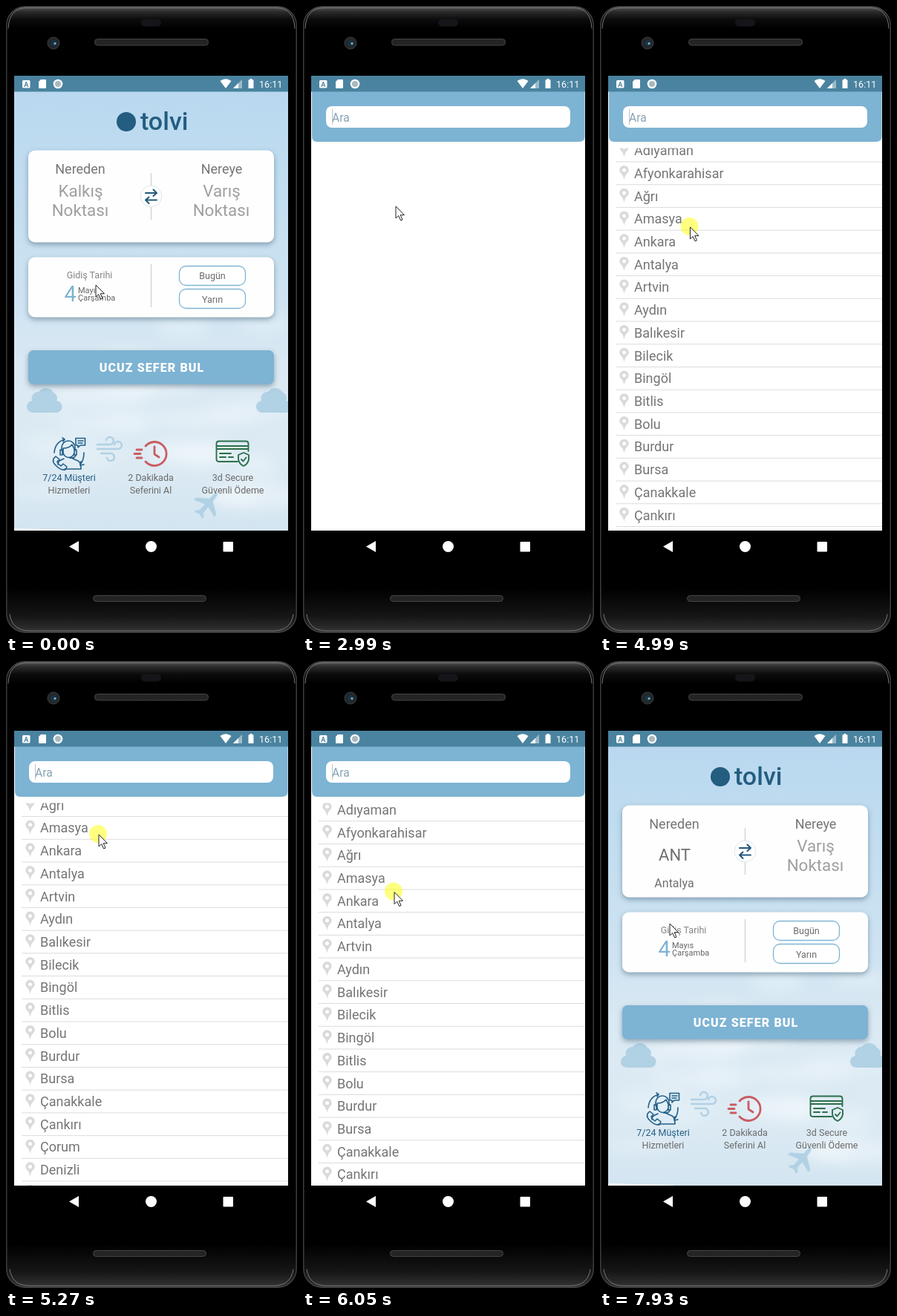
Write an HTML page that moves like this. It is 392 px wide and 845 px high and loops after 8000 ms.

```html
<!DOCTYPE html>
<html lang="tr">
<head>
<meta charset="utf-8">
<title>Sefer arama</title>
<style>
html, body { margin: 0; width: 100%; height: 100%; overflow: hidden; background: #000; }
svg { display: block; width: 392px; height: 845px; font-family: Roboto, sans-serif; }
.mid { text-anchor: middle; }
.line { fill: none; stroke-linecap: round; stroke-linejoin: round; }
.card { fill: #fefefe; filter: drop-shadow(0 3px 3.5px #3c5a7080); }
.t12 { font-size: 12.5px; fill: #6b6b6b; }
.t18 { font-size: 18px; fill: #757575; }
.t22 { font-size: 22.4px; fill: #a0a0a0; }
</style>
</head>
<body>
<svg viewBox="0 0 392 845">
  <defs>
    <linearGradient id="sky" x2="0" y2="1">
      <stop offset="0" stop-color="#b9d8ef"/><stop offset=".25" stop-color="#c3def0"/>
      <stop offset=".5" stop-color="#d0e4f2"/><stop offset=".62" stop-color="#dae9f3"/>
      <stop offset=".85" stop-color="#dceaf3"/><stop offset="1" stop-color="#d3e5f1"/>
    </linearGradient>
    <linearGradient id="body" x2="0" y2="1">
      <stop offset="0" stop-color="#5a5a5a"/><stop offset=".008" stop-color="#2c2c2c"/>
      <stop offset=".02" stop-color="#0c0c0c"/><stop offset=".035" stop-color="#000"/>
      <stop offset=".93" stop-color="#000"/><stop offset=".975" stop-color="#161616"/>
      <stop offset="1" stop-color="#353535"/>
    </linearGradient>
    <pattern id="mesh" width="3" height="3" patternUnits="userSpaceOnUse">
      <rect width="3" height="3" fill="#2b2b2b"/><path d="M0 3L3 0" stroke="#161616"/>
    </pattern>
    <filter id="soft" x="-50%" y="-50%" width="200%" height="200%"><feGaussianBlur stdDeviation="9"/></filter>
    <clipPath id="screen"><rect x="11" y="94" width="369" height="613"/></clipPath>
    <clipPath id="listArea"><rect x="11" y="191.5" width="369" height="515.5"/></clipPath>
    <path id="cloud" d="M-15 16a8 8 0 0 1-2-16a9 9 0 0 1 9-12a12 12 0 0 1 20 1a8 8 0 0 1 4 11a8 8 0 0 1-1 16Z"/>
    <g id="pin"><path d="M0 9.5C-2-.5-6.2 1-6.2-3.6a6.2 6.2 0 0 1 12.4 0C6.2 1 2-.5 0 9.5Z" fill="#dadada"/><circle cy="-3.6" r="2.5" fill="#fff"/></g>
  </defs>

  <rect width="392" height="845" fill="#000"/>
  <rect x=".8" y=".8" width="390.4" height="843.4" rx="25" fill="url(#body)" stroke="#4a4a4a" stroke-width="1.2"/>
  <path class="line" d="M3 30Q4 3 28 2.500H364Q388 3 389 30M5 820Q8 841 30 842H362Q384 841 387 820" stroke="#777"/>
  <rect x="182" y="17.500" width="27" height="10" rx="5" fill="#15151a"/>
  <rect x="119.500" y="44.500" width="153" height="8.500" rx="4" fill="url(#mesh)" stroke="#444"/>
  <rect x="117.500" y="794.500" width="152" height="8" rx="4" fill="url(#mesh)" stroke="#444"/>
  <circle cx="64" cy="50" r="8" fill="#23272a" stroke="#3a3e42"/>
  <circle cx="64.500" cy="50" r="4" fill="#183444"/><circle cx="66" cy="50.500" r="1.500" fill="#87b5c8"/>

  <g fill="#fff">
    <path d="M85 728.500L98 721V736Z"/><circle cx="195.500" cy="728.500" r="7.500"/>
    <rect x="292.500" y="722" width="13.500" height="13.500" rx="1"/>
  </g>

  <g clip-path="url(#screen)">
    <g id="home">
      <rect x="11" y="115" width="369" height="592" fill="url(#sky)"/>
      <g id="haze" fill="#f2f8fb" filter="url(#soft)"></g>
      <path d="M11 704L100 706.500V707H11Z" fill="#fff"/>
      <g fill="#b1d1e4">
        <use href="#cloud" x="52" y="532"/><use href="#cloud" x="361" y="532"/>
        <path transform="translate(272 671) rotate(40)" d="M0-20Q3-18 3-7L18 4V8L3 3V13L7 17V20L0 18L-7 20V17L-3 13V3L-18 8V4L-3-7Q-3-18 0-20Z"/>
      </g>
      <path class="line" d="M123 591H140a5 5 0 1 0-5-6M123 597H151a5 5 0 1 0-5-6M128 603H140a5 5 0 1 1-4 6" stroke="#b1d1e4" stroke-width="2.600"/>

      <circle cx="162" cy="156" r="13" fill="#235d80"/>
      <text x="181" y="167" font-size="34" font-weight="500" fill="#235d80">tolvi</text>

      <rect class="card" x="30" y="194.500" width="331" height="124" rx="9"/>
      <rect class="card" x="30" y="338.500" width="331" height="81" rx="9"/>
      <path d="M195.500 225V288M195.500 348V406" stroke="#c9c9c9"/>
      <circle cx="195.500" cy="256.500" r="14.300" fill="#fff" stroke="#dfe5e9"/>
      <path class="line" d="M188 252H203M198.500 247.500L203 252L198.500 256M203 261.500H188M192.500 257.500L188 261.500L192.500 266" stroke="#22587c" stroke-width="2"/>
      <g class="mid">
        <text class="t18" x="100" y="226">Nereden</text>
        <text class="t18" x="290.500" y="226">Nereye</text>
        <g id="unset" class="t22"><text x="100.500" y="256.500">Kalkış</text><text x="100" y="283">Noktası</text></g>
        <g id="chosen"><text x="100.500" y="269" font-size="22" fill="#6e6e6e">ANT</text><text x="100" y="305" font-size="16" fill="#707070">Antalya</text></g>
        <text class="t22" x="290.500" y="256.500">Varış</text><text class="t22" x="290" y="283">Noktası</text>
        <text class="t12" x="112.500" y="367" style="fill:#858585">Gidiş Tarihi</text>
        <g fill="#fff" stroke="#7fb4d3" stroke-width="1.300">
          <rect x="233.500" y="350.500" width="89" height="26" rx="9"/><rect x="233.500" y="381.500" width="89" height="26" rx="9"/>
        </g>
        <text class="t12" x="278" y="368">Bugün</text><text class="t12" x="278" y="399.500">Yarın</text>
      </g>
      <text x="78.500" y="397.500" font-size="29" fill="#7db3d3">4</text>
      <g font-size="11" fill="#666"><text x="97" y="387">Mayıs</text><text x="97" y="397">Çarşamba</text></g>

      <rect class="card" x="30" y="464" width="331" height="45.500" rx="7" style="fill:#7db3d3"/>
      <text class="mid" x="196.500" y="493" font-size="16" font-weight="900" letter-spacing="1.100" fill="#fff">UCUZ SEFER BUL</text>

      <g class="line" stroke="#225f88" stroke-width="1.600">
        <path d="M75 599V595a9 9 0 0 1 18 0V599M77 596Q85 596 89 591Q91 595 92 597V601a7.500 7.500 0 0 1-15 0ZM73 598h3v7h-3ZM92 598h3v7h-3ZM94 605Q93 610 86 609M78 610L72 613Q70 614 70 618M90 610L97 613Q101 615 101 624H79"/>
        <path d="M65 602Q66 588 79 584L76 582M79 584L77 587M105 602Q105 612 100 618M101 614L100 619L105 618"/>
        <path d="M64 610Q62 615 68 620Q74 626 80 625L82 621L77 617L74 620Q69 616 69 614L72 611L67 607Z"/>
        <path d="M94 582.500H106.500V592H100L97 595V592H94ZM97 586H104M97 589H103"/>
      </g>
      <g class="line" stroke="#c85d62" stroke-width="2.800">
        <path d="M188 593A16 16 0 1 1 188 614M200 594V604L206 608M176 598H183M173 603.500H181M176 609H183"/>
      </g>
      <g class="line" stroke="#2d6f4b" stroke-width="1.900">
        <path d="M312 614H287Q283.500 614 283.500 610.500V590Q283.500 586.500 287 586.500H323Q326.500 586.500 326.500 590V600M284 593H326M284 597H326M288 603H303M288 608H296M300 608H306M317 592.500"/>
        <path d="M320 602L327 605V611Q326 617 320 620Q314 617 313 611V605ZM317 611L319.500 613.500L323.500 608.500"/>
      </g>
      <g class="t12 mid">
        <text x="85" y="640" fill="#265f85">7/24 Müşteri</text><text x="85" y="657">Hizmetleri</text>
        <text x="195" y="640">2 Dakikada</text><text x="195" y="657">Seferini Al</text>
        <text x="305.500" y="640">3d Secure</text><text x="305.500" y="657">Güvenli Ödeme</text>
      </g>
    </g>

    <g id="search">
      <rect x="11" y="115" width="369" height="592" fill="#fff"/>
      <path d="M12 115H379.500V176Q379.500 183 372 183H19Q12 183 12 176Z" fill="#7db3d3"/>
      <rect x="31" y="135" width="329" height="29" rx="8" fill="#fff"/>
      <text x="39" y="155.500" font-size="15.600" fill="#87a3b5">Ara</text>
      <path id="caret" d="M39.500 139V160" stroke="#b9c4cc"/>
      <circle id="spinner" class="line" cx="196" cy="411" r="16" stroke="#7db3d3" stroke-width="3"/>
      <g clip-path="url(#listArea)"><g id="list"></g></g>
    </g>

    <rect x="11" y="94" width="369" height="21.500" fill="#4a83a0"/>
    <g fill="#fff">
      <rect x="22" y="100" width="10.500" height="10.500" rx="1.500"/>
      <text class="mid" x="27.300" y="108.500" font-size="9" font-weight="700" style="fill:#4a83a0">A</text>
      <path d="M47 99H53Q54 99 54 100V110Q54 111 53 111H45Q44 111 44 110V102Z"/>
      <circle cx="70" cy="105" r="6.300"/><circle cx="70" cy="105" r="4" fill="#a9b9bf"/>
      <path d="M288.500 101Q296 95.500 303.500 101L296 111Z"/>
      <path d="M318 99V111H306Z" opacity=".45"/><path d="M313 104V111H306Z"/>
      <path d="M328.500 98H331.500V99.500H333.500V111H326.500V99.500H328.500Z"/>
      <text x="341" y="109.500" font-size="12.600">16:11</text>
    </g>

    <g id="pointer">
      <circle id="press" cx="-1" cy="-1" r="12" fill="#ff0" opacity=".5"/>
      <path d="M0 0V16L3.700 12.600L6.600 19L9 18L6.200 11.700H11.500Z" fill="#fff" stroke="#222"/>
    </g>
  </g>
</svg>
<script>
const LOOP = 8000, ROW = 30.72;
const $ = id => document.getElementById(id);
const ui = Object.fromEntries(['home', 'search', 'unset', 'chosen', 'caret', 'spinner', 'list', 'pointer', 'press', 'haze'].map(id => [id, $(id)]));

const cities = ('Adana,Adıyaman,Afyonkarahisar,Ağrı,Amasya,Ankara,Antalya,Artvin,Aydın,Balıkesir,Bilecik,' +
  'Bingöl,Bitlis,Bolu,Burdur,Bursa,Çanakkale,Çankırı,Çorum,Denizli,Diyarbakır,Edirne,Elazığ').split(',');
ui.list.innerHTML = cities.map((name, i) => `<g transform="translate(0 ${207.5 + i * ROW})">
  <use href="#pin" x="32.500" y="-.5"/><text x="46" y="6.500" class="t18">${name}</text>
  <path d="M21 15.400H379.500" stroke="#dcdcdc"/></g>`).join('');
const rows = [...ui.list.children];

// Loose bands of cloud over the lower half.
let seed = 7;
const random = () => (seed = seed * 16807 % 2147483647) / 2147483647;
ui.haze.innerHTML = Array.from({ length: 24 }, () => {
  const y = 430 + random() * 250;
  return `<ellipse cx="${11 + random() * 369}" cy="${y}" rx="${25 + random() * 50}" ry="${6 + random() * 13}" opacity="${.2 + random() * .35}"/>`;
}).join('');

// [time, x, y]
const path = [[610, 121, 376], [860, 130, 345], [1100, 129, 295], [1280, 125, 270], [4220, 125, 270],
  [4620, 119, 343], [4780, 119, 343], [5270, 125, 234], [5420, 125, 230], [5760, 125, 281],
  [6060, 123, 312], [6250, 122, 314], [6700, 93, 370], [6840, 90, 357], [7929, 90, 357], [7930, 94, 354]];
// [time, offset]
const scroll = [[4780, 0], [5270, 105.5], [5440, 110], [5760, 68.5], [6080, 36], [6400, 32.5]];
const presses = [[1310, 1440], [4690, 6180], [6860, 7000]];

const ease = k => k * (1 - k) * .5 * (2 * k - 1) + k;
function sample(keys, t, col) {
  const next = keys.findIndex(key => key[0] > t);
  if (next === 0) return keys[0][col];
  if (next < 0) return keys.at(-1)[col];
  const a = keys[next - 1], b = keys[next];
  return a[col] + (b[col] - a[col]) * ease((t - a[0]) / (b[0] - a[0]));
}
const show = (el, on) => el.setAttribute('display', on ? 'inline' : 'none');
const within = (t, from, to) => t >= from && t < to;

function render(t) {
  const searching = within(t, 2990, 7200);
  show(ui.home, !searching);
  show(ui.search, searching);
  show(ui.unset, t < 7200);
  show(ui.chosen, t >= 7200);
  ui.unset.setAttribute('opacity', t >= 1970 ? .6 : 1);

  show(ui.caret, Math.floor((t - 2850) / 500) % 2 === 0);
  show(ui.spinner, within(t, 3050, 3820));
  const turn = (t - 3050) / 770;
  ui.spinner.setAttribute('stroke-dasharray', `${8 + 60 * Math.sin(Math.PI * turn) ** 2} 101`);
  ui.spinner.setAttribute('transform', `rotate(${-90 + 400 * turn} 196 411)`);

  const count = t < 3820 ? 0 : t < 3890 ? 10 : rows.length;
  rows.forEach((row, i) => show(row, i < count));
  ui.list.setAttribute('transform', `translate(0 ${-sample(scroll, t, 1)})`);

  ui.pointer.setAttribute('transform', `translate(${sample(path, t, 1)} ${sample(path, t, 2)})`);
  show(ui.press, presses.some(([from, to]) => within(t, from, to)));
}

const start = performance.now();
function frame() {
  render((performance.now() - start) % LOOP);
  requestAnimationFrame(frame);
}
frame();
</script>
</body>
</html>
```
